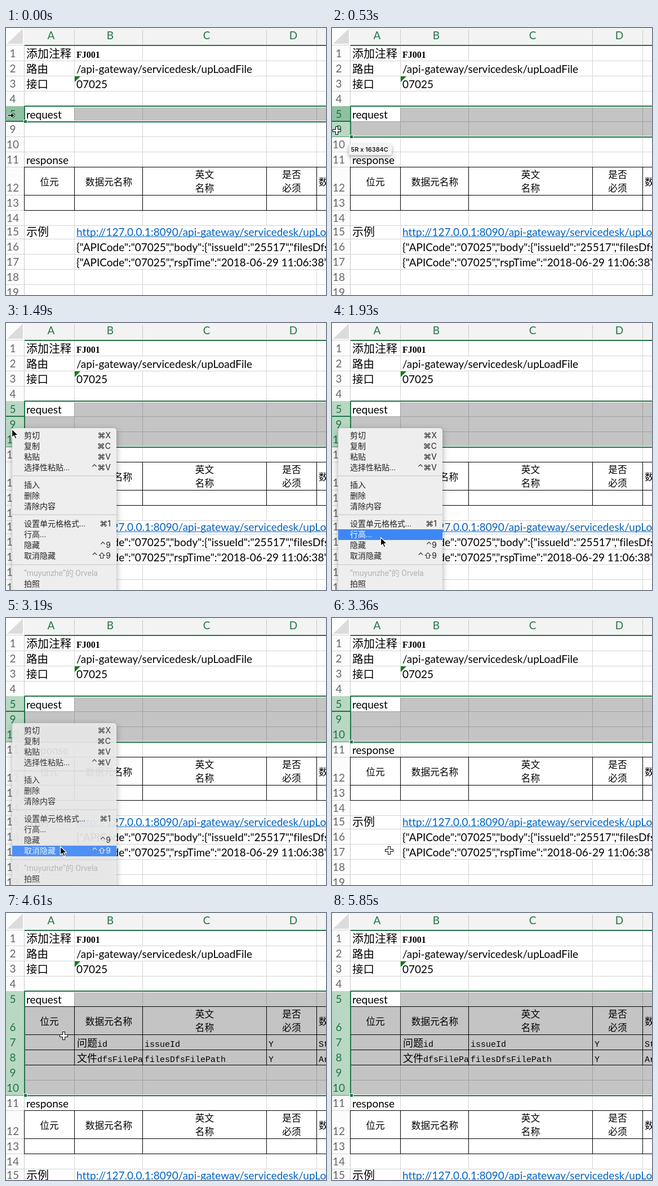
An HTML page with a canvas that plays this animation: 568x475 px, repeating every 7220 ms.

```html
<!DOCTYPE html>
<html lang="zh">
<head>
<meta charset="utf-8">
<style>
html, body { margin: 0; width: 100%; height: 100%; overflow: hidden; background: #fff; }
canvas { display: block; width: 568px; height: 475px; }
</style>
</head>
<body>
<canvas id="stage"></canvas>
<script>
const W = 568, H = 475, LOOP = 7220, TICK = 88.5;
const canvas = document.getElementById('stage');
const scale = window.devicePixelRatio || 1;
canvas.width = W * scale;
canvas.height = H * scale;
const ctx = canvas.getContext('2d');

const CJK = '"Noto Sans CJK SC", "Noto Sans CJK JP", sans-serif';
const CELL = '19px Lato, ' + CJK;
const SONG = '300 19.5px ' + CJK;
const HEAD = '500 16.7px ' + CJK;
const MONO = '15px "Liberation Mono", monospace';
const GREEN = '#217346', GRID = '#d4d4d4';
const COLS = [32, 121, 242, 462, 551];

// Cursor path: tick, x, y
const PATH = [
  [0, 8, 155], [2, 8, 155], [3, 8, 158], [8, 8, 198], [11, 8, 198], [15, 9, 189],
  [17, 10, 188], [19, 10, 188], [20, 38, 250], [22, 86, 381], [25, 96, 406],
  [37, 96, 406], [38, 101, 413], [42, 101, 413], [45, -7, 228], [47, 18, 56],
  [49, 104, 72], [50, 120, 140], [51, 103, 216], [52, 102, 218], [54, 105, 219],
  [55, 105, 219], [58, 350, 306], [60, 350, 306], [65, 518, 470], [66, 540, 500]
];

const MENU = [
  [200, '剪切', '⌘X'], [219, '复制', '⌘C'], [238, '粘贴', '⌘V'], [257, '选择性粘贴...', '⌃⌘V'],
  [288, '插入'], [307, '删除'], [326, '清除内容'],
  [357, '设置单元格格式...', '⌘1'], [376, '行高...'], [395, '隐藏', '⌃9'], [414, '取消隐藏', '⌃⇧9'],
  [445, '“muyunzhe”的 Orvela', '', true], [464, '拍照']
];

function rect(x, y, w, h, color) {
  ctx.fillStyle = color;
  ctx.fillRect(x, y, w, h);
}

function text(str, x, y, font, color = '#000', align = 'left') {
  ctx.font = font;
  ctx.fillStyle = color;
  ctx.textAlign = align;
  ctx.fillText(str, x, y);
}

function shape(points, color) {
  ctx.beginPath();
  points.forEach(([x, y]) => ctx.lineTo(x, y));
  ctx.closePath();
  ctx.fillStyle = color;
  ctx.fill();
}

function panel(x, y, w, h, radius, color, blur) {
  ctx.save();
  ctx.shadowColor = 'rgba(0,0,0,.35)';
  ctx.shadowBlur = blur * scale;
  ctx.shadowOffsetY = 3 * scale;
  ctx.beginPath();
  ctx.roundRect(x, y, w, h, radius);
  ctx.fillStyle = color;
  ctx.fill();
  ctx.restore();
}

function layout(unhidden) {
  const heights = { 6: 50, 12: 50, 15: 24 };
  const rows = {};
  let y = 31;
  for (let n = 1; y < H; n++) {
    if (!unhidden && n > 5 && n < 9) continue;
    const h = heights[n] || 27;
    rows[n] = { top: y, bottom: y + h, h };
    y += h;
  }
  return rows;
}

function cursorAt(k) {
  const i = PATH.findIndex(p => p[0] >= k);
  if (i < 0) return null;
  if (i === 0) return { x: PATH[0][1], y: PATH[0][2] };
  const [k0, x0, y0] = PATH[i - 1], [k1, x1, y1] = PATH[i];
  const u = (k - k0) / (k1 - k0);
  return { x: x0 + (x1 - x0) * u, y: y0 + (y1 - y0) * u };
}

function drawGrid(rows, last) {
  const bottom = rows[last].bottom;
  rect(33, 139, W, bottom - 139, '#c4c4c4');
  rect(33, 139, 88, 27, '#fff');
  for (const [n, r] of Object.entries(rows)) {
    const selected = n >= 5 && n <= last;
    const color = selected ? '#a0a0a0' : GRID;
    rect(33, r.bottom, W, 1, color);
    COLS.slice(1).forEach((x, i) => {
      const covered = (n == 2 && i === 1) || (n >= 15 && n <= 17 && i > 0);
      if (!covered) rect(x, r.top, 1, r.h, color);
    });
  }
}

function drawTable(rows, first, final) {
  if (!rows[first]) return;
  const top = rows[first].top, end = rows[final].bottom;
  rect(32, top, W, 1, '#000');
  for (let n = first; n <= final; n++) rect(32, rows[n].bottom, W, 1, '#000');
  COLS.forEach(x => rect(x, top, 1, end - top, '#000'));
  const title = (str, x, dy) => text(str, x, top + dy, HEAD, '#000', 'center');
  title('位元', 77, 33);
  title('数据元名称', 182.5, 33);
  title('英文', 352.5, 20);
  title('名称', 352.5, 44);
  title('是否', 507, 20);
  title('必须', 507, 44);
  text('数据类型', 555, top + 33, HEAD);
}

function drawCells(rows) {
  const put = (n, x, str, font = CELL, color) => {
    if (rows[n]) text(str, x, rows[n].bottom - 5.5, font, color);
  };
  put(1, 36, '添加注释', '500 20px ' + CJK);
  put(1, 125, 'FJ001', 'bold 16px "Liberation Serif", serif');
  put(2, 36, '路由', SONG);
  put(2, 125, '/api-gateway/servicedesk/upLoadFile');
  put(3, 36, '接口', SONG);
  put(3, 125, '07025');
  shape([[122, 86], [132, 86], [122, 96]], '#107c10');
  put(5, 36, 'request');
  put(11, 36, 'response');

  const song18 = '300 18px ' + CJK;
  put(7, 126, '问题', song18);
  put(7, 162, 'id', MONO);
  put(8, 126, '文件', song18);
  ctx.save();
  ctx.beginPath();
  ctx.rect(122, 0, 120, H);
  ctx.clip();
  put(8, 162, 'dfsFilePath', MONO);
  ctx.restore();
  [[7, 'issueId', 'String'], [8, 'filesDfsFilePath', 'Array']].forEach(([n, name, type]) => {
    put(n, 246, name, MONO);
    put(n, 466, 'Y', MONO);
    put(n, 555, type, MONO);
  });

  put(15, 36, '示例', '20px ' + CJK);
  put(15, 125, 'http://127.0.0.1:8090/api-gateway/servicedesk/upLoadFile', CELL, '#0563c1');
  rect(125, rows[15].bottom - 4, W, 1, '#0563c1');
  put(16, 125, '{"APICode":"07025","body":{"issueId":"25517","filesDfsFilePath":[]}}');
  put(17, 125, '{"APICode":"07025","rspTime":"2018-06-29 11:06:38"}');
}

function drawHeaders(rows, last, k) {
  rect(0, 0, 32, H, '#fcfcfc');
  rect(32, 0, W, 30, '#f3f3f3');
  shape([[2, 28], [30, 28], [30, 1]], '#dcdcdc');
  rect(0, 30, 33, 1, GRID);
  COLS.slice(1).forEach(x => rect(x, 3, 1, 26, '#c9c9c9'));
  rect(33, 30, W, 2, GREEN);
  [['A', 80], ['B', 185], ['C', 356], ['D', 510]].forEach(([c, x]) => text(c, x, 20, CELL, GREEN, 'center'));

  for (const [n, r] of Object.entries(rows)) {
    const selected = n >= 5 && n <= last;
    if (selected) rect(0, r.top, 32, r.h, n == 5 && k < 13 ? '#90c0a2' : '#b9d8c4');
    rect(0, r.bottom, 32, 1, selected ? '#579672' : GRID);
    text(n, 12, r.bottom - 6.5, CELL, selected ? GREEN : '#666', 'center');
  }
  // A thick line marks the hidden rows
  if (!rows[6]) rect(0, rows[5].bottom - 1, 32, 2, GREEN);

  const bottom = rows[last].bottom;
  rect(32, 139, 2, bottom - 139, GREEN);
  rect(34, 140, W, 1, '#fff');
  rect(33, 138, W, 2, GREEN);
  rect(34, bottom - 1, W, 1, '#fff');
  rect(33, bottom, W, 2, GREEN);
  rect(31, bottom - 3, 7, 7, '#fff');
  rect(32, bottom - 2, 5, 5, GREEN);
}

function drawTooltip(last, cursor, k) {
  if (k < 3 || k > 14) return;
  ctx.globalAlpha = k < 11 ? 1 : 0.9 - (k - 11) * 0.27;
  panel(30, cursor.y + 24, 76, 20, 3, '#f3f3f3', 7);
  text(`${last - 4}R x 16384C`, 33.5, cursor.y + 38, '500 11px Inter, sans-serif', '#000');
  ctx.globalAlpha = 1;
}

function drawMenu(cursor, k) {
  if (k < 17 || k > 37) return;
  ctx.globalAlpha = k < 36 ? 1 : k === 36 ? 0.9 : 0.45;
  panel(11, 187, 185, 330, 5, '#eeeeee', 12);
  [272, 341, 430].forEach(y => rect(11, y - 1, 185, 2, '#d9d9d9'));
  for (const [y, label, keys = '', disabled] of MENU) {
    const active = k >= 20 && !disabled && Math.abs(cursor.y - y) <= 9.5;
    if (active) rect(11, y - 9, 185, 19, '#3d87f5');
    const color = active ? '#fff' : disabled ? '#b3b3b3' : '#222';
    text(label, 32, y + 5, '14px Roboto, ' + CJK, color);
    text(keys, 186, y + 5, '14px Inter, "DejaVu Sans", sans-serif', color, 'right');
  }
  ctx.globalAlpha = 1;
}

function drawCursor({ x, y }, k) {
  ctx.save();
  ctx.translate(Math.round(x) + 0.5, Math.round(y) + 0.5);
  ctx.lineJoin = 'round';
  if (k >= 17 && k < 38) {
    shape([[0, 0], [0, 15], [3.5, 12], [6, 17.5], [8.5, 16.5], [6, 11], [11, 11]], '#000');
    ctx.lineWidth = 1.2;
    ctx.strokeStyle = '#fff';
    ctx.stroke();
  } else if (k < 3 || (k > 13 && k < 17)) {
    shape([[-5, -1], [1, -1], [1, -4], [6, 0], [1, 4], [1, 1], [-5, 1]], '#000');
    ctx.lineWidth = 2;
    ctx.strokeStyle = '#fff';
    ctx.stroke();
    ctx.fill();
  } else {
    const plus = (size, width, color) => {
      rect(-size, -width / 2, size * 2, width, color);
      rect(-width / 2, -size, width, size * 2, color);
    };
    plus(7.5, 5, '#000');
    plus(6.5, 3, '#fff');
  }
  ctx.restore();
}

function draw(ms) {
  const k = Math.floor((ms + 21) / TICK);
  const cursor = cursorAt(k);
  const rows = layout(k >= 40);
  const last = k >= 8 ? 10 : cursor.y > 193 ? 10 : cursor.y > 166 ? 9 : 5;

  ctx.setTransform(scale, 0, 0, scale, 0, 0);
  ctx.textBaseline = 'alphabetic';
  ctx.textRendering = 'optimizeSpeed'; // no kerning or ligatures
  rect(0, 0, W, H, '#fff');
  rect(32, 31, 1, H, '#c8c8c8');
  drawGrid(rows, last);
  drawTable(rows, 6, 8);
  drawTable(rows, 12, 13);
  drawCells(rows);
  drawHeaders(rows, last, k);
  if (!cursor) return;
  drawTooltip(last, cursor, k);
  drawMenu(cursor, k);
  drawCursor(cursor, k);
}

const start = performance.now();
function frame() {
  draw((performance.now() - start) % LOOP);
  requestAnimationFrame(frame);
}
frame();
</script>
</body>
</html>
```
